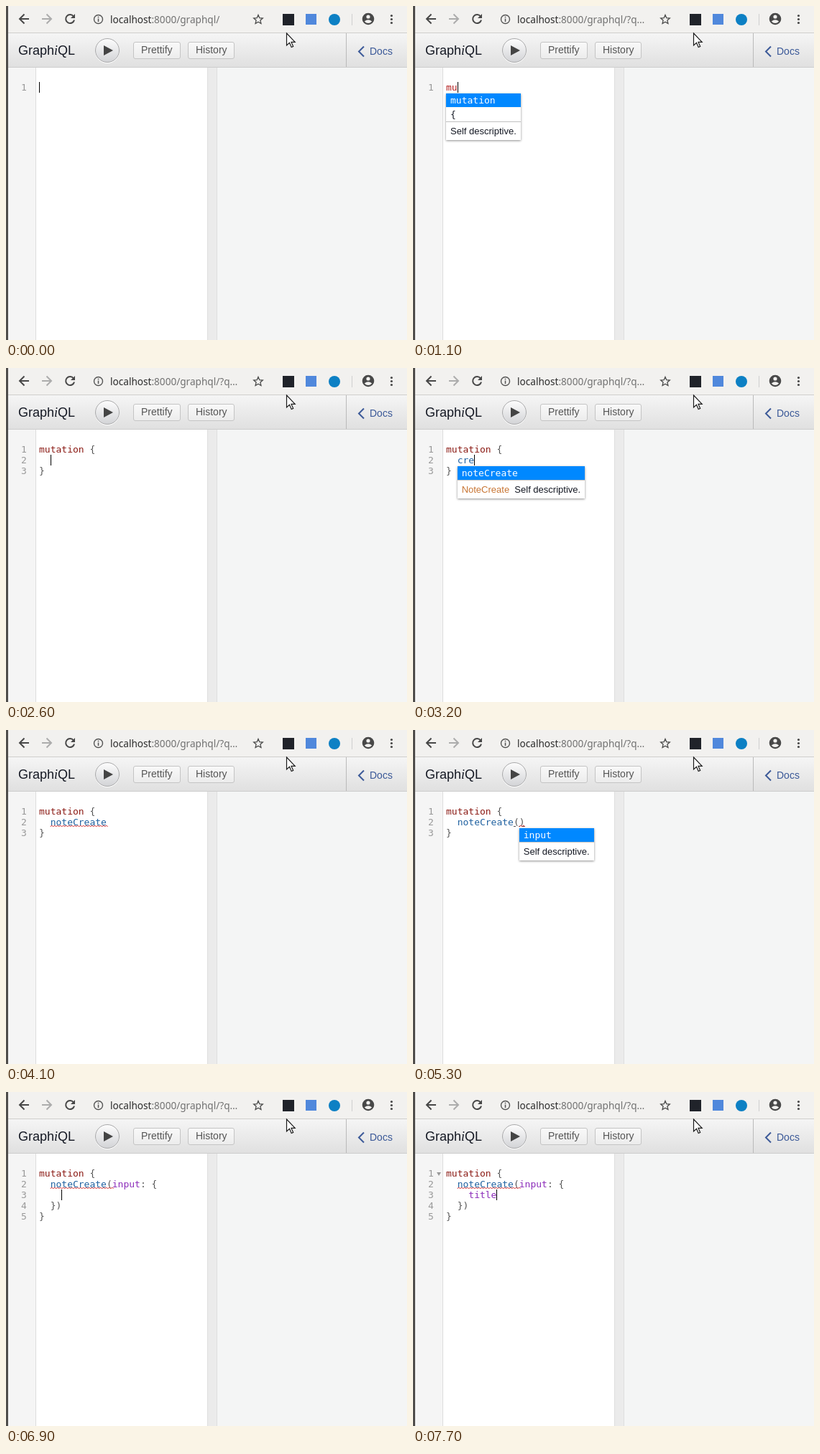
Animation of 558x466 px, one loop 8000 ms. Source, as an HTML page:

```html
<!DOCTYPE html>
<html lang="en">
<head>
<meta charset="utf-8">
<title>GraphiQL autocomplete</title>
<style>
  html, body { margin: 0; width: 100%; height: 100%; overflow: hidden; background: #fff; }
  #stage { position: absolute; left: 0; top: 0; width: 558px; height: 466px; overflow: hidden; }
  #stage > * { position: absolute; }
  svg { left: 0; top: 0; }
  svg text { font-family: "Liberation Sans", Arial, sans-serif; font-size: 14px; }
  svg .url { font-family: "Noto Sans", sans-serif; font-size: 13.6px; }

  .mono { margin: 0; font: 13px/15px "DejaVu Sans Mono", monospace; white-space: pre; }
  #numbers { left: 21px; top: 106px; color: #999; }
  #code { left: 46px; top: 106px; color: #555; }
  .keyword { color: #8b1a14; }
  .partial { color: #b11a1a; }
  .field { color: #1f61a0; }
  .argument { color: #8b2bb9; }
  .match { text-decoration: underline; }
  #caret { width: 1px; height: 15px; background: #000; }

  #hints { background: #fff; box-shadow: 0 1px 3px rgba(0, 0, 0, .45); color: #141823; }
  #hints .item { padding: 2px 6px; border-top: 1px solid #f7f7f7; }
  #hints .item:first-child { border-top: 0; background: #08f; color: #fff; }
  #hints .info {
    height: 15px; padding: 5px 6px; border-top: 1px solid #c0c0c0;
    font: 13px/15px "Liberation Sans", Arial, sans-serif;
  }
  #hints .type { color: #c87533; }
</style>
</head>
<body>
<div id="stage">
  <svg width="558" height="466" viewBox="0 0 558 466">
    <defs>
      <linearGradient id="bar" x2="0" y2="1"><stop stop-color="#f5f5f5"/><stop offset="1" stop-color="#e0e0e0"/></linearGradient>
      <linearGradient id="button" x2="0" y2="1"><stop stop-color="#f9f9f9"/><stop offset="1" stop-color="#ececec"/></linearGradient>
      <linearGradient id="run" x2="0" y2="1"><stop stop-color="#fdfdfd"/><stop offset="1" stop-color="#d2d3d6"/></linearGradient>
    </defs>

    <!-- Browser toolbar -->
    <rect width="558" height="38" fill="#f2f1ef"/>
    <rect y="37" width="558" height="1" fill="#cfcecc"/>
    <g fill="none" stroke="#484848" stroke-width="2">
      <path d="M32 18H19.5M25.5 11.5L19 18l6.5 6.5"/>
      <path d="M50 18h12.500M56.500 11.500L63 18l-6.500 6.500" stroke="#acacac"/>
      <path d="M94 14.500A6 6 0 1 0 95 19.500"/>
      <path d="M96 11v6h-6z" fill="#484848" stroke="none"/>
      <circle cx="128.500" cy="18.500" r="6" stroke="#555" stroke-width="1.400"/>
      <path d="M128.500 17.500v4.500M128.500 14.800v1.500" stroke="#555" stroke-width="1.500"/>
      <path d="M351 12.500l1.800 4.200 4.500.4-3.400 3 1 4.400-3.900-2.300-3.900 2.300 1-4.400-3.400-3 4.500-.4z" stroke-width="1.300"/>
    </g>
    <text class="url" x="145" y="24" fill="#2b2b2b">localhost<tspan fill="#717171">:8000/graphql/<tspan id="query"></tspan></tspan></text>
    <rect x="385" y="11" width="16" height="16" fill="#20232a"/>
    <rect x="417" y="11" width="15" height="15" fill="#5088dc"/>
    <circle cx="457" cy="19" r="8" fill="#0d80c4"/>
    <rect x="481" y="11" width="1" height="16" fill="#cfcfcf"/>
    <circle cx="504" cy="18" r="8.300" fill="#484848"/>
    <circle cx="504" cy="15" r="2.600" fill="#f2f1ef"/>
    <path d="M498.800 21.500q5.200-4.500 10.400 0q-5.200 5-10.400 0z" fill="#f2f1ef"/>
    <g fill="#484848"><circle cx="536.500" cy="13.500" r="1.600"/><circle cx="536.500" cy="18.500" r="1.600"/><circle cx="536.500" cy="23.500" r="1.600"/></g>

    <!-- Application bar -->
    <rect y="38" width="558" height="47" fill="url(#bar)"/>
    <rect y="85" width="558" height="1" fill="#cdcdcd"/>
    <text x="17" y="68" fill="#141823" style="font-size:18px">Graph<tspan font-family="Liberation Serif, serif" font-style="italic">i</tspan>QL</text>
    <circle cx="141" cy="63" r="17" fill="#fff"/>
    <circle cx="141" cy="62" r="16.500" fill="url(#run)" stroke="#a9a9aa"/>
    <path d="M136 55l13 7-13 7z" fill="#444"/>
    <g fill="url(#button)" stroke="#c4c4c4">
      <rect x="177.500" y="50.500" width="65" height="23" rx="2.500"/>
      <rect x="253.500" y="50.500" width="64" height="23" rx="2.500"/>
    </g>
    <g fill="#555"><text x="188" y="66">Prettify</text><text x="264" y="66">History</text></g>
    <rect x="473" y="38" width="1" height="47" fill="#bababa"/>
    <path d="M498 56.500l-7 7 7 7" fill="none" stroke="#3b5998" stroke-width="2"/>
    <text x="506" y="68" fill="#3b5998">Docs</text>

    <!-- Editor and result panes -->
    <rect y="86" width="41" height="380" fill="#f5f5f5"/>
    <rect x="41" y="86" width="1" height="380" fill="#ddd"/>
    <rect x="42" y="86" width="238" height="380" fill="#fff"/>
    <rect x="280" y="86" width="14" height="380" fill="#dedede"/>
    <rect x="281" y="86" width="12" height="380" fill="#ebebeb"/>
    <rect x="294" y="86" width="264" height="380" fill="#f4f5f5"/>
    <rect width="3" height="466" fill="#504e4c"/>
    <path id="fold" d="M33 112h6l-3 5z" fill="#999"/>
    <path d="M390.500 38v17l4-3.700 2.700 6.200 2.500-1.100-2.700-6h5.200z" fill="#fff" stroke="#1a1a1a" stroke-width="1.200"/>
  </svg>
  <pre id="numbers" class="mono"></pre>
  <pre id="code" class="mono"></pre>
  <svg width="558" height="466"><path id="squiggle" fill="none" stroke="#d01818" stroke-width=".9"/></svg>
  <div id="caret" class="mono"></div>
  <div id="hints" class="mono"></div>
</div>

<script>
const LOOP = 8000, LEFT = 46, TOP = 106, LINE = 15, CHAR = 7.826;
const $ = id => document.getElementById(id);

const KINDS = {
  mutation: 'keyword',
  c: 'field', cr: 'field', cre: 'field', noteCreate: 'field',
  input: 'argument', t: 'argument', title: 'argument'
};
const OPENERS = { ')': '(', '}': '{' };

const hint = (row, col, items, type = '') => ({ row, col, items, type });
const keywords = (...items) => hint(0, 0, items);
const fieldHint = hint(1, 2, ['noteCreate'], 'NoteCreate');
const inputHint = hint(1, 13, ['input']);
const titleHint = hint(2, 4, ['title', 'content'], 'String');

const root = body => `mutation {\n  ${body}\n}`;
const nested = body => root(`noteCreate(input: {\n    ${body}\n  })`);

// Time, text (| visible caret, ¦ hidden caret), hints, text with a lint error.
const steps = [
  [0, '|'],
  [500, '¦'],
  [900, 'm|'],
  [1000, 'm|', keywords('mutation', 'fragment', '{')],
  [1100, 'mu|', keywords('mutation', '{')],
  [1300, 'mut|', keywords('mutation')],
  [1400, 'muta|', keywords('mutation')],
  [1500, 'mutat|', keywords('mutation')],
  [1600, 'mutati|', keywords('mutation')],
  [1800, 'mutation|'],
  [2200, 'mutation |'],
  [2400, 'mutation {|}'],
  [2600, root('|')],
  [3000, root('c|')],
  [3100, root('cr|'), fieldHint],
  [3200, root('cre|'), fieldHint],
  [3600, root('noteCreate|')],
  [4100, root('noteCreate¦'), null, 'noteCreate'],
  [4600, root('noteCreate(|)'), null, 'noteCreate'],
  [4700, root('noteCreate(|)'), inputHint, 'noteCreate'],
  [5300, root('noteCreate(¦)'), inputHint, ')'],
  [5400, root('noteCreate(input|)'), null, ')'],
  [5800, root('noteCreate(input:|)'), null, ')'],
  [5900, root('noteCreate(input: |)'), null, ')'],
  [6100, root('noteCreate(input: {|})'), null, ')'],
  [6600, root('noteCreate(input: {¦})'), null, 'noteCreate('],
  [6900, nested('|'), null, 'noteCreate('],
  [7200, nested('t|'), null, 'noteCreate('],
  [7300, nested('t|'), titleHint, 'noteCreate('],
  [7700, nested('title|'), null, 'noteCreate(']
];

function place(el, row, col, dy = 0) {
  el.style.left = `calc(${LEFT}px + ${col}ch)`;
  el.style.top = TOP + row * LINE + dy + 'px';
}

function highlight(text, caret) {
  const opener = OPENERS[text[caret]];
  const pair = opener ? [text.lastIndexOf(opener, caret), caret] : [];
  return text.replace(/\w+|[^\w\s]/g, (token, at) => {
    const kind = /\w/.test(token) ? KINDS[token] || 'partial' : pair.includes(at) ? 'match' : '';
    return `<span class="${kind}">${token}</span>`;
  });
}

function zigzag(line, error) {
  const col = error ? line.indexOf(error) : -1;
  if (col < 0) return '';
  const waves = Math.round(error.length * CHAR / 4);
  return `M${LEFT + col * CHAR} ${TOP + 2 * LINE - 1}` + 'l2-2l2 2'.repeat(waves);
}

function showHints(h) {
  $('hints').hidden = !h;
  $('hints').style.display = h ? 'block' : 'none';
  if (!h) return;
  const type = h.type && `<span class="type">${h.type}</span>  `;
  $('hints').innerHTML = h.items.map(i => `<div class="item">${i}</div>`).join('') +
    `<div class="info">${type}Self descriptive.</div>`;
  place($('hints'), h.row, h.col, LINE + 1);
}

function show([at, marked, hints, error]) {
  const caret = marked.search(/[|¦]/);
  const text = marked.replace(/[|¦]/, '');
  const before = text.slice(0, caret).split('\n');
  const lines = text.split('\n');

  $('code').innerHTML = highlight(text, caret);
  $('numbers').textContent = lines.map((_, i) => i + 1).join('\n');
  $('caret').style.visibility = marked[caret] === '|' ? 'visible' : 'hidden';
  place($('caret'), before.length - 1, before.at(-1).length);
  $('squiggle').setAttribute('d', zigzag(lines[1] || '', error));
  $('query').textContent = at >= 1000 ? '?q…' : '';
  $('fold').style.display = at >= 7200 ? 'inline' : 'none';
  showHints(hints);
}

let start, current;
function tick(now) {
  start ??= now;
  const time = (now - start) % LOOP;
  const step = steps.findLast(([at]) => at <= time);
  if (step !== current) show(current = step);
  requestAnimationFrame(tick);
}
show(steps[0]);
requestAnimationFrame(tick);
</script>
</body>
</html>
```
